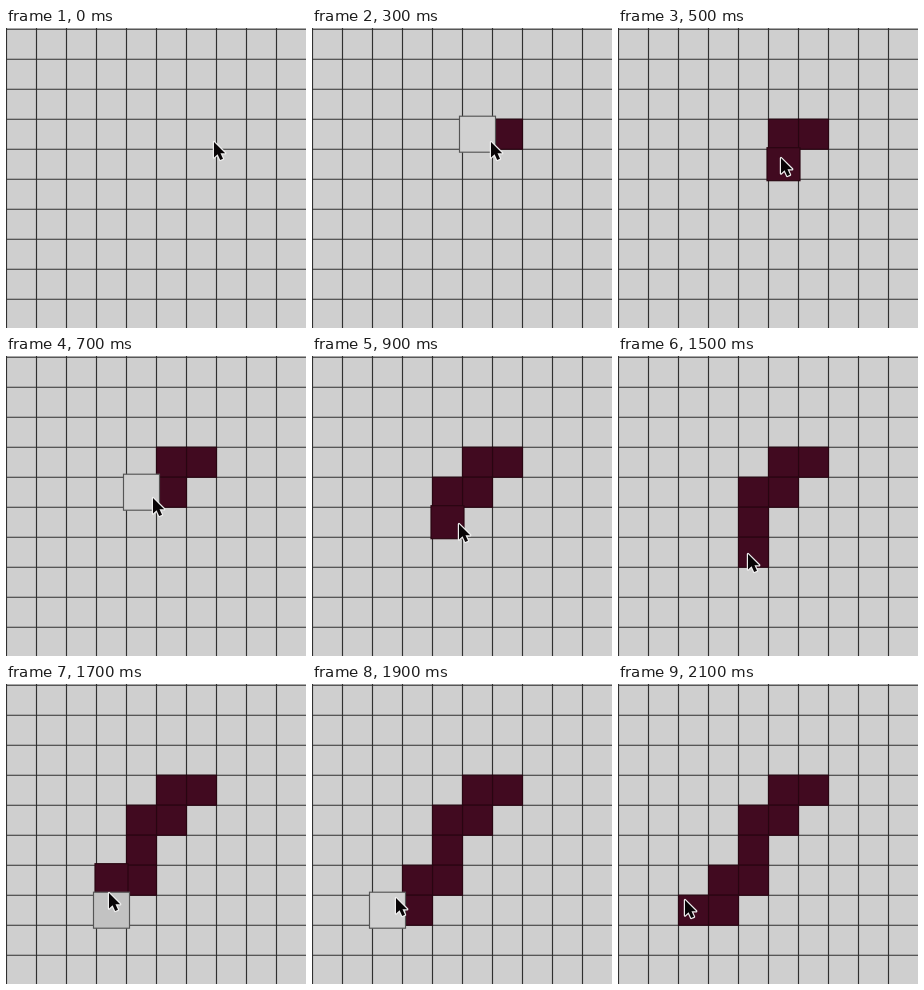
These frames come from a looping animation (300x300 px, 2.2 s). An HTML page with a canvas:

```html
<!DOCTYPE html>
<html>
<head>
<meta charset="utf-8">
<style>
html, body { margin: 0; width: 100%; height: 100%; overflow: hidden; background: #cfcfcf; }
canvas { display: block; }
</style>
</head>
<body>
<canvas id="stage" width="300" height="300"></canvas>
<script>
const ctx = document.getElementById('stage').getContext('2d');
const STEP = 100, STEPS = 22, SIZE = 30;
const LEFT = 0.5, TOP = 1.2;

// Hovered cells: column, row, step of entry, first tone
const cells = [
  [6, 3, 1, '#d1d1d1'],
  [5, 3, 3, '#d1d1d1'],
  [5, 4, 4, '#d1d1d1'],
  [4, 4, 7, '#d1d1d1'],
  [4, 5, 8, '#d1d1d1'],
  [4, 6, 11, '#d1d1d1'],
  [3, 6, 16, '#d1d1d1'],
  [3, 7, 17, '#c2c2c2'],
  [2, 7, 19, '#d1d1d1']
];

// Pointer path: step, x, y
const path = [
  [0, 208, 114], [3, 179, 114], [4, 168, 124], [5, 163, 130], [6, 162, 131],
  [7, 147, 142], [8, 144, 158], [9, 147, 168], [12, 147, 193], [13, 147, 194],
  [14, 143, 195], [16, 117, 201], [17, 103, 209], [19, 84, 214], [21, 67, 216]
];
const arrow = new Path2D('M0 0V15.5L3.6 12.2L6.2 18L9 16.8L6.5 11.2H11.2Z');

function pointerAt(step) {
  const i = Math.max(1, path.findIndex(p => p[0] >= step));
  const [s0, x0, y0] = path[i - 1], [s1, x1, y1] = path[i];
  const k = (step - s0) / (s1 - s0);
  return [x0 + (x1 - x0) * k, y0 + (y1 - y0) * k];
}

function drawGrid() {
  ctx.fillStyle = '#cfcfcf';
  ctx.fillRect(0, 0, 300, 300);
  ctx.strokeStyle = '#303030';
  ctx.lineWidth = 1.15;
  ctx.beginPath();
  for (let i = 0; i < 10; i++) {
    const x = LEFT + i * SIZE, y = TOP + i * SIZE;
    ctx.moveTo(x, 0);
    ctx.lineTo(x, 300);
    ctx.moveTo(0, y);
    ctx.lineTo(300, y);
  }
  ctx.stroke();
}

function drawCell([col, row, enter, tone], step) {
  const age = step - enter;
  if (age < 0) return;
  const size = SIZE * (1.2 - 0.1 * Math.min(age, 2));
  const x = LEFT + (col + 0.5) * SIZE - size / 2;
  const y = TOP + (row + 0.5) * SIZE - size / 2;
  ctx.fillStyle = age ? '#410a20' : tone;
  ctx.strokeStyle = age ? '#280511' : '#555';
  ctx.lineWidth = 1.15;
  ctx.fillRect(x, y, size, size);
  ctx.strokeRect(x, y, size, size);
}

function drawPointer(step) {
  ctx.save();
  ctx.translate(...pointerAt(step));
  ctx.lineJoin = 'round';
  ctx.lineWidth = 2.4;
  ctx.strokeStyle = '#eee';
  ctx.stroke(arrow);
  ctx.fillStyle = '#080406';
  ctx.fill(arrow);
  ctx.restore();
}

function draw() {
  const step = Math.floor(performance.now() / STEP) % STEPS;
  drawGrid();
  cells.forEach(cell => drawCell(cell, step));
  drawPointer(step);
  requestAnimationFrame(draw);
}
draw();
</script>
</body>
</html>
```
